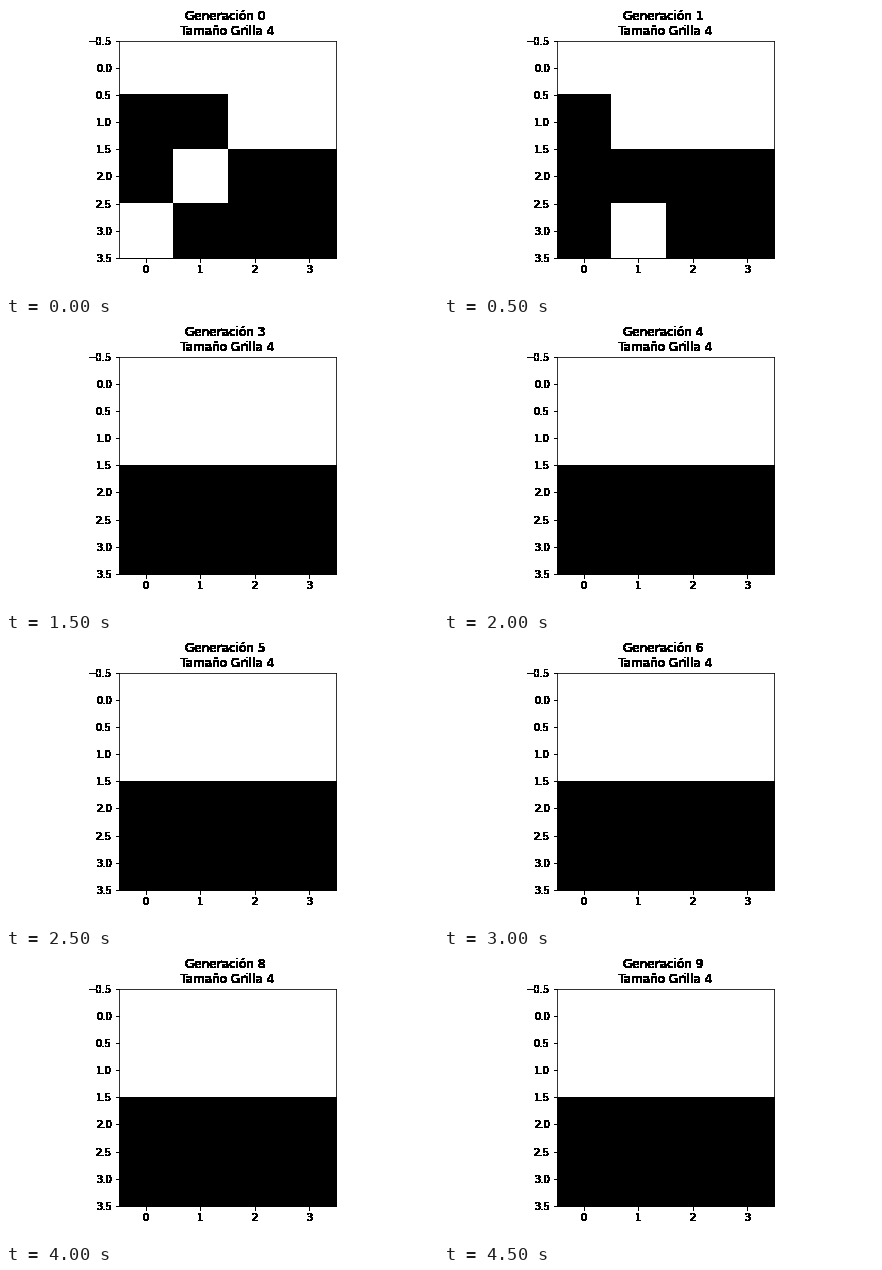
These frames come from a looping animation (432 px wide and 288 px high, 5 s). A matplotlib script:

```python
import numpy as np
import matplotlib.pyplot as plt
from matplotlib.animation import FuncAnimation

SIZE = 4
STEPS = 10


def first_grid():
    """Black cells are 1; the top is white, with two loose white cells."""
    grid = np.ones((SIZE, SIZE), int)
    grid[0] = 0
    grid[1, 2:] = 0
    grid[2, 1] = grid[3, 0] = 0
    return grid


def vote(grid):
    """Each cell joins the majority of its four neighbours; a tie keeps it."""
    total = sum(np.roll(grid, shift, axis)
                for shift in (-1, 1) for axis in (0, 1))
    return np.where(total == 2, grid, total > 2).astype(int)


def grid_at(step):
    grid = first_grid()
    for _ in range(step):
        grid = vote(grid)
    return grid


def solid(img, dpi):
    """Make every touched pixel opaque, so edges are hard."""
    img[..., 3] = img[..., 3] > 0
    return img, 0, 0


plt.rcParams.update({"font.family": "DejaVu Sans", "font.size": 10,
                     "axes.titlesize": 12})
fig, ax = plt.subplots(figsize=(6, 4), dpi=72, facecolor="white")
fig.subplots_adjust(left=0.125, right=0.9, bottom=0.125, top=0.88)

image = ax.imshow(first_grid(), cmap="binary", vmin=0, vmax=1,
                  interpolation="nearest")
ax.set_xticks(range(SIZE))
ax.set_yticks(np.arange(-0.5, SIZE, 0.5))
title = ax.set_title("")

hard = [title, ax.spines["bottom"]]
for axis in (ax.xaxis, ax.yaxis):
    for tick in axis.get_major_ticks():
        hard += [tick.label1, tick.tick1line]
for artist in hard:
    artist.set_agg_filter(solid)


def update(step):
    image.set_data(grid_at(step))
    title.set_text(f"Generación {step} \nTamaño Grilla {SIZE}")
    return image, title


anim = FuncAnimation(fig, update, frames=STEPS, interval=500, repeat=True,
                     repeat_delay=0, blit=False)
plt.show()
```
